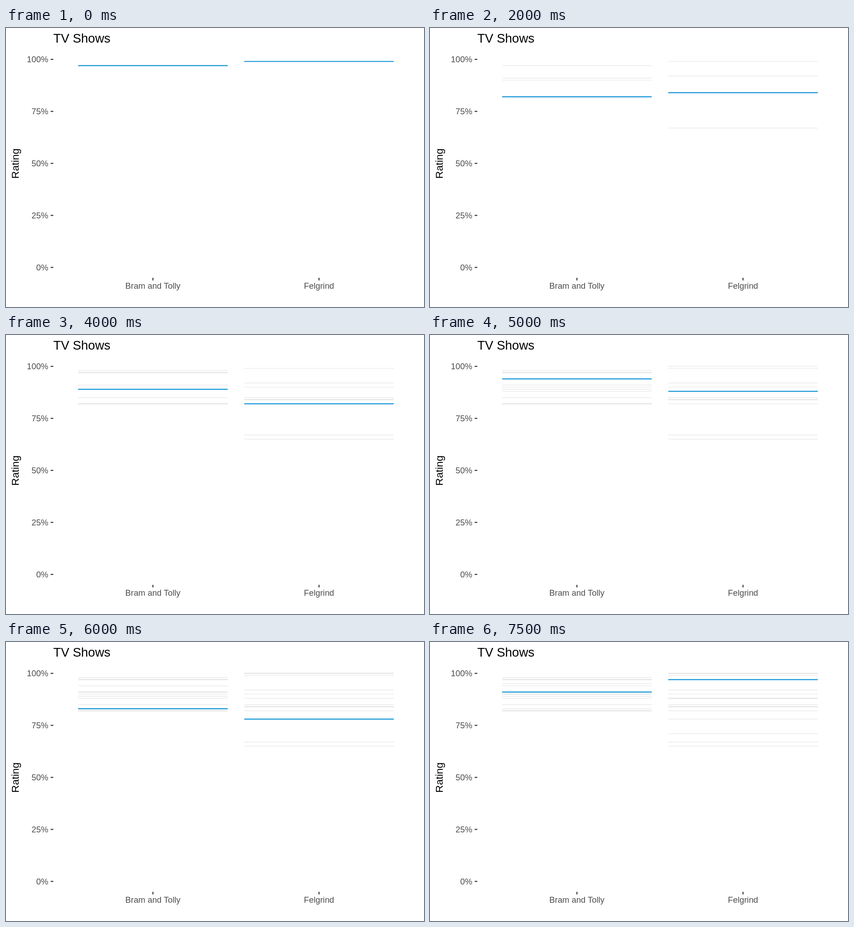
An HTML page for the animation above (8000 ms loop, 917 by 611 pixels).

```html
<!DOCTYPE html>
<html lang="en">
<head>
<meta charset="utf-8">
<title>TV Shows</title>
<style>
  html, body { margin: 0; width: 100%; height: 100%; overflow: hidden; background: #fff; }
  svg { display: block; width: 917px; height: 611px; font-family: "Liberation Sans", Arial, sans-serif; }
  line { stroke-width: 2.22; }
  .tick { stroke: #333; }
  .label { font-size: 18.33px; fill: #4d4d4d; }
  .past { stroke: #000; stroke-opacity: .06; }
  .current { stroke: #1295d8; }
</style>
</head>
<body>
<svg viewBox="0 0 917 611">
  <text x="103.7" y="32" font-size="27.5">TV Shows</text>
  <text transform="translate(28.3 296.8) rotate(-90)" font-size="22.92" text-anchor="middle">Rating</text>
  <g id="axes"></g>
  <g id="marks"></g>
</svg>
<script>
const STEP = 500;
const HALF_WIDTH = 164.1;
const shows = [
  { name: "Bram and Tolly", x: 322.3,
    ratings: [97, 82, 91, 90, 82, 85, 98, 97, 89, 88, 94, 91, 83, 90, 95, 91] },
  { name: "Felgrind", x: 686.7,
    ratings: [99, 84, 92, 67, 84, 90, 65, 85, 82, 100, 88, 100, 78, 88, 71, 97] }
];
const steps = shows[0].ratings.length;
const axes = document.getElementById("axes");
const marks = document.getElementById("marks");

const yOf = percent => 524.3 - 4.556 * percent;

function add(parent, tag, attrs, text = "") {
  const node = document.createElementNS("http://www.w3.org/2000/svg", tag);
  for (const key in attrs) node.setAttribute(key, attrs[key]);
  node.textContent = text;
  return parent.appendChild(node);
}

function addLine(parent, x1, y1, x2, y2, cls) {
  return add(parent, "line", { x1, y1, x2, y2, class: cls });
}

for (let p = 0; p <= 100; p += 25) {
  const y = yOf(p);
  addLine(axes, 98, y, 103.7, y, "tick");
  add(axes, "text", { x: 92.7, y: y + 6.7, class: "label", "text-anchor": "end" }, p + "%");
}

for (const { name, x } of shows) {
  addLine(axes, x, 547.1, x, 552.8, "tick");
  add(axes, "text", { x, y: 571.3, class: "label", "text-anchor": "middle" }, name);
}

// Earlier ratings stay as faint marks, so repeated values grow darker.
const lines = shows.flatMap(({ x, ratings }) => ratings.map((rating, step) => {
  const y = yOf(rating);
  return { step, node: addLine(marks, x - HALF_WIDTH, y, x + HALF_WIDTH, y, "past") };
}));

let shown = -1;

function render(time) {
  const now = Math.floor(time / STEP) % steps;
  if (now !== shown) {
    shown = now;
    for (const { step, node } of lines) {
      node.style.display = step > now ? "none" : "";
      node.setAttribute("class", step === now ? "current" : "past");
    }
  }
}

function tick() {
  render(performance.now());
  requestAnimationFrame(tick);
}

render(0);
requestAnimationFrame(tick);
</script>
</body>
</html>
```
